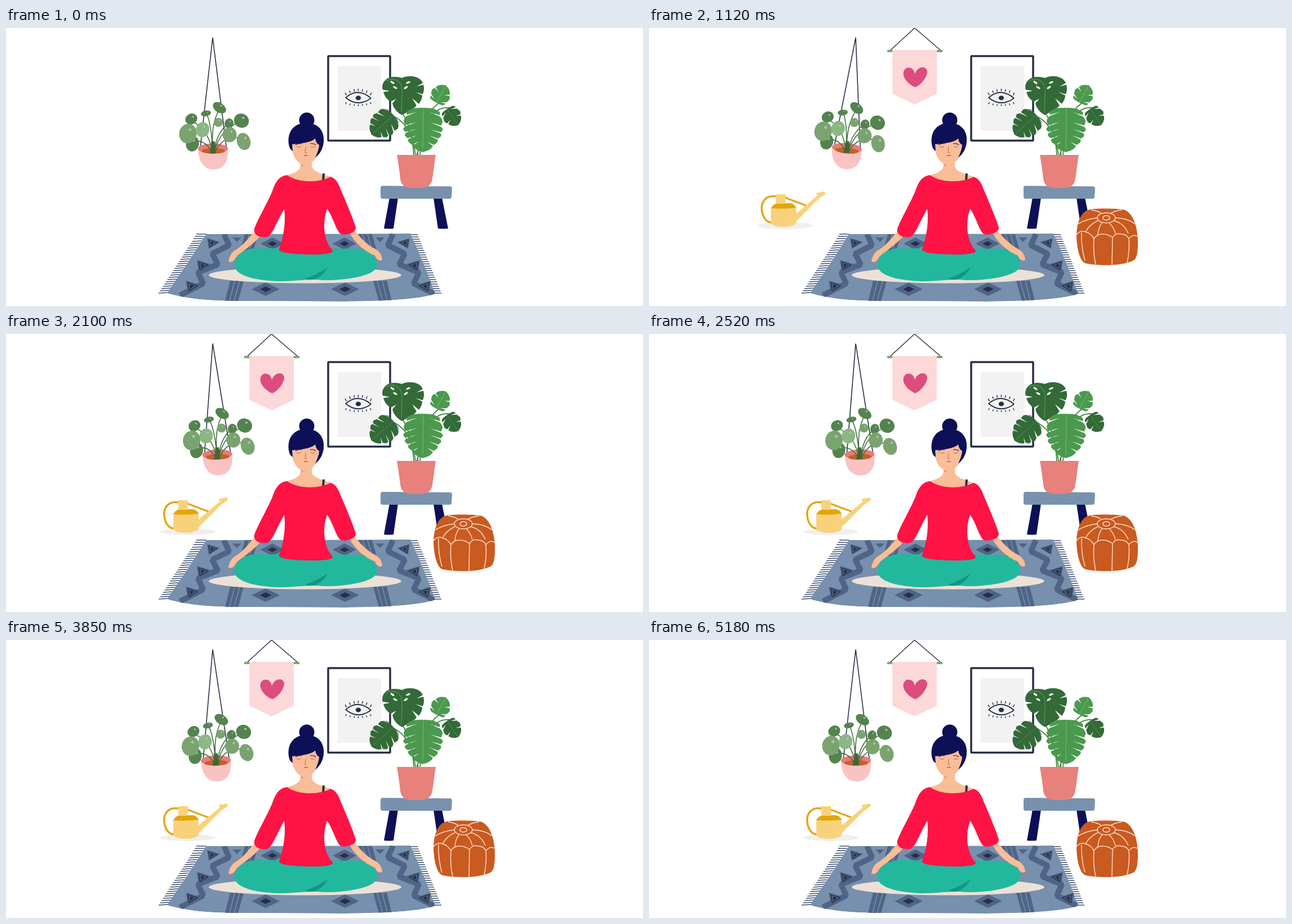
An HTML page with a canvas for the animation above (5.25 s loop, 1131x495 px).

```html
<!DOCTYPE html>
<html lang="en">
<head>
<meta charset="utf-8">
<title>Meditation room</title>
<style>
html, body { margin: 0; width: 100%; height: 100%; overflow: hidden; background: #fff; }
canvas { display: block; width: 1131px; height: 495px; }
</style>
</head>
<body>
<canvas id="stage" width="1131" height="495"></canvas>
<script>
const ctx = document.getElementById('stage').getContext('2d');
ctx.lineJoin = 'bevel';
const LOOP = 5250, STEP = 70;
const NAVY = '#0d1057', INK = '#272f47', SKIN = '#f9bd97', RUG = '#7690ad', BAND = '#4f6486';
const DARK = '#336a38', MID = '#4b994e', STEM = '#41803f';

// Sideways swing of the hanging plant: time, offset in px
const swing = [[0, 0], [470, 13.3], [560, 12.6], [1120, -14], [1270, -17.5], [1680, -4], [2240, 10],
  [2340, 12.5], [2520, 5.5], [2800, -9.5], [3050, -18], [3360, -9], [3850, 4.5], [4180, 13],
  [4480, -2], [4780, -18], [5040, -8.5], [5180, 0], [5250, 0]];

function fill(color, d) {
  ctx.fillStyle = color;
  ctx.fill(new Path2D(d));
}

function line(color, width, d) {
  ctx.strokeStyle = color;
  ctx.lineWidth = width;
  ctx.stroke(new Path2D(d));
}

function oval(color, x, y, rx, ry, rot = 0) {
  ctx.fillStyle = color;
  ctx.beginPath();
  ctx.ellipse(x, y, rx, ry, rot, 0, 7);
  ctx.fill();
}

function shifted(dx, draw) {
  ctx.save();
  ctx.translate(dx, 0);
  draw();
  ctx.restore();
}

const ramp = (t, from, to) => Math.min(1, Math.max(0, (t - from) / (to - from)));

// Monotone cubic through the given points
function curve(pts, t) {
  let i = 0;
  while (i < pts.length - 2 && t >= pts[i + 1][0]) i++;
  const rate = k => (pts[k + 1][1] - pts[k][1]) / (pts[k + 1][0] - pts[k][0]);
  const slope = k => {
    if (k === 0) return rate(0);
    if (k === pts.length - 1) return 0;
    const a = rate(k - 1), b = rate(k);
    return a * b <= 0 ? 0 : 2 * a * b / (a + b);
  };
  const [t0, y0] = pts[i], [t1, y1] = pts[i + 1];
  const h = t1 - t0, u = (t - t0) / h, v = 1 - u;
  return v * v * (1 + 2 * u) * y0 + u * u * (3 - 2 * u) * y1 + h * u * v * (v * slope(i) - u * slope(i + 1));
}

function diamond(color, x, y, w, h) {
  fill(color, `M${x - w},${y}L${x},${y - h}L${x + w},${y}L${x},${y + h}Z`);
}

function rugSide() {
  line(BAND, 10, 'M387,367L396,387L366,402L376,421L341,435L350,455L309,476');
  for (const [x, y, s] of [[368, 383, 1], [351, 423, 1.1], [332, 460, 1.15]]) {
    ctx.save();
    ctx.translate(x, y);
    ctx.scale(s, s);
    fill(BAND, 'M-11,-9L12,-2L-8,10Z');
    line(INK, 1.3, 'M-8,-6L7,-1L-6,7Z');
    fill(INK, 'M-5,-3L2,-1L-4,4Z');
    ctx.restore();
  }
  fill(BAND, 'M402,373L418,373L410,381Z');
  fill(BAND, 'M424,367L448,367L439,396L416,396Z');
  fill(BAND, 'M398,450L422,450L412,486L389,486Z');
  line(RUG, 1.5, 'M406,450L397,486M415,450L405,486M432,367L424,396M441,367L432,396');
}

function rug() {
  let d = '';
  for (let i = 0; i < 27; i++) {
    const k = i / 26;
    const y = 367 + 104 * k, l = 355 - 67 * k, r = 718 + 42 * k;
    d += `M${l},${y}l-17,${k < .1 ? 0 : 1}M${r},${y + 1}l13,0`;
  }
  line('#3b4d6e', 1.5, d);
  const shape = 'M355,367L718,366Q743,420 762,473C740,482 690,486 600,487L420,486C370,486 325,484 286,472Q322,420 355,367Z';
  ctx.save();
  ctx.clip(new Path2D(shape));
  fill(RUG, shape);
  rugSide();
  ctx.translate(1074, 0);
  ctx.scale(-1, 1);
  rugSide();
  ctx.restore();
  for (const [x, y, w, h] of [[473, 384, 21, 11], [601, 384, 21, 11], [461, 465, 25, 12], [602, 465, 25, 12]]) {
    diamond(BAND, x, y, w, h);
    diamond(INK, x, y, w * .4, h * .42);
  }
  oval('#ece1d7', 531, 440, 171, 14.5);
}

function woman() {
  fill(SKIN, 'M523,232L523,246C520,257 508,259 499,262C518,278 555,278 579,266C568,261 547,258 543,247L543,232Z');
  fill('#eb9f7e', 'M523,238Q533,246 541,236Q536,243 523,247Z');
  fill(SKIN, 'M507,204C506,226 517,243 531,244C546,243 557,225 556,204L534,190Z');
  oval(NAVY, 534, 164, 13.5, 13.5);
  fill(NAVY, 'M502,207C499,184 512,169 533,169C555,169 566,184 564,203C563,215 557,225 549,231C553,222 556,214 556,208C552,206 550,202 549,197C540,204 524,206 508,207L509,219C504,216 503,212 502,207Z');
  line(NAVY, 1.2, 'M514,208Q519,205 525,206M540,206Q546,205 550,208');
  line('#c2605a', 1, 'M516,211Q520,214 524,211M541,211Q545,214 549,211M532,212L531,222L534,222');
  line('#dc5a55', 1.7, 'M529,227L536,227');
  line(INK, 4, 'M564,259L563,273');
  fill(SKIN, 'M439,364C428,378 418,389 408,395C400,399 396,408 395,416C401,419 406,413 410,406C420,397 440,385 451,371Z');
  fill('#22b89e', 'M440,392C415,396 404,411 406,425C410,444 455,451 490,451C512,451 540,446 562,449C600,450 652,442 658,426C662,408 645,396 626,393Z');
  fill('#149681', 'M531,446C546,441 560,434 571,426C566,436 560,441 552,446C546,449 537,449 531,446Z');
  fill(SKIN, 'M618,360C630,374 642,387 655,393C663,397 668,405 668,413C662,416 657,411 655,405C642,400 626,390 612,369Z');
  fill('#ff1345', 'M499,262C485,263 478,275 473,290C464,312 448,338 441,357C438,369 452,374 464,372C474,367 478,350 494,322C497,345 493,372 485,393C482,399 500,402 530,403C562,404 585,402 579,395C563,377 562,345 570,322C580,335 583,352 592,365C599,372 623,365 621,355C615,336 603,308 594,287C589,273 584,267 576,265C555,276 519,276 499,262Z');
}

function picture() {
  ctx.fillStyle = '#f2f2f2';
  ctx.fillRect(589, 68, 77, 115);
  ctx.strokeStyle = INK;
  ctx.lineWidth = 3.5;
  ctx.strokeRect(572, 50, 110, 150.5);
  line(INK, 1.8, 'M603,124Q625,105 648,125Q625,142 603,124Z');
  oval(INK, 625.5, 124.5, 4.7, 4);
  let d = '';
  for (let i = -3; i <= 3; i++) {
    const x = 625.5 + i * 7, dip = i * i * .8;
    d += `M${x},${112.5 + dip}l${i * .8},-4.5M${x},${136 - dip * .5}l${i * .6},3`;
  }
  line(INK, 1.4, d);
}

// Split leaf from its base to its tip, with n lobes on each side
function leaf(color, vein, x0, y0, x1, y1, w, n) {
  const h = Math.hypot(x1 - x0, y1 - y0), side = [];
  for (let k = 0; k < n; k++) {
    for (let j = 0; j <= 5; j++) {
      const t = (k + j / 5 * (k < n - 1 ? .84 : 1)) / n;
      const bulge = 1 - .04 * Math.abs(j - 2.5);
      side.push([w * Math.pow(Math.max(0, Math.sin(Math.PI * Math.pow(t, .85))), .6) * bulge,
        h * (t - .11 * Math.sin(Math.PI * Math.min(1, t * 2.4)))]);
    }
    if (k < n - 1) {
      const [px, py] = side[side.length - 1];
      side.push([px * .38, py - h * .07]);
    }
  }
  side[side.length - 1] = [0, h];
  ctx.save();
  ctx.translate(x0, y0);
  ctx.rotate(Math.atan2(y1 - y0, x1 - x0) - Math.PI / 2);
  ctx.beginPath();
  side.forEach(p => ctx.lineTo(p[0], p[1]));
  side.reverse().forEach(p => ctx.lineTo(-p[0], p[1]));
  ctx.closePath();
  ctx.fillStyle = color;
  ctx.fill();
  line(vein, 1, `M0,0L0,${h * .92}`);
  ctx.restore();
}

function monstera() {
  line(STEM, 1.8, 'M724,227Q722,180 703,150M727,227Q722,175 690,158M731,227Q733,160 768,134M735,227Q740,140 787,142M729,227L740,195');
  fill(DARK, 'M703,89C715,83 735,85 740,98L729,104L741,101C743,107 742,113 740,118L727,114L739,120C739,126 736,131 733,135L721,125L729,138C721,147 709,151 703,155C694,150 688,143 686,134L693,126L683,131C676,127 672,121 670,114L682,112L669,110C665,98 676,86 689,87C696,87 700,88 703,89Z');
  line('#4f8b4b', 1.6, 'M675,94C692,86 704,96 703,115L702,150');
  for (const [x, y, r] of [[714, 97, .4], [710, 106, .6], [691, 106, -.5], [686, 97, -.6]]) oval('#fff', x, y, 4, 1.7, -r);
  leaf(DARK, '#4f8b4b', 688, 155, 649, 190, 25, 5);
  leaf(MID, '#78b874', 741, 142, 740, 221, 36, 7);
  leaf(MID, '#78b874', 764, 133, 781, 102, 18, 3);
  leaf(DARK, '#4f8b4b', 783, 144, 803, 173, 17, 3);
  fill('#e8807c', 'M694,226L763,226C760,245 759,257 757,268C755,283 745,285 728,285C711,285 702,283 700,268C698,250 696,238 694,226Z');
}

function stool() {
  fill(NAVY, 'M681,302L696,302L688,357Q680,358 671,357Z');
  fill(NAVY, 'M759,302L774,302L785,357Q776,358 767,357Z');
  fill('#7892ad', 'M669,281L788,282Q792,282 792,286L791,301Q791,304 787,304L669,304Q665,304 665,300L665,285Q665,281 669,281Z');
}

function hangingPlant(offset) {
  ctx.save();
  ctx.translate(367, 17);
  ctx.rotate(-offset / 171);
  ctx.translate(-367, -17);
  line(INK, 1.6, 'M345,212L367,17L391,211');
  fill('#f9c3c4', 'M341,214C341,239 352,252 369,252C386,252 396,238 394,214Z');
  oval('#e97b79', 367.5, 214.5, 26.5, 9);
  oval('#c4602a', 368, 219, 21, 5);
  line('#41703c', 1.6, 'M366,222Q362,184 331,166M366,222Q354,198 333,202M367,222Q365,170 356,153M368,222Q362,170 380,144M369,222Q374,184 396,170M369,222Q382,176 416,168M370,222Q388,186 420,198');
  fill('#3c6837', 'M361,223Q366,212 364,202L371,202Q370,213 373,223Z');
  const deep = '#54834f', soft = '#7aa370';
  for (const [x, y, rx, ry, rot, color] of [
    [329, 162, 11, 9.5, -.5, deep], [331, 206, 11.5, 14, .2, deep], [323, 188, 15.5, 17.5, .2, soft],
    [349, 181, 12, 13.5, .2, '#8cb683'], [355, 152, 9, 5, -.2, deep], [379, 142, 13, 8.5, .6, deep],
    [377, 168, 8, 8, 0, soft], [396, 170, 8, 9, .2, deep], [418, 165, 13.5, 12.5, .5, deep],
    [397, 190, 12.5, 13.5, 0, soft], [422, 202, 12, 15.5, -.3, soft]]) {
    oval(color, x, y, rx, ry, rot);
    oval('#a9cb9f', x + rx * .25, y - ry * .4, rx * .16, ry * .14, .5);
  }
  ctx.restore();
}

function banner() {
  line(INK, 1.4, 'M428,40L471.5,0L518,40');
  fill('#7fa36f', 'M423,39H521V43H423Z');
  fill('#fcd8d8', 'M432,39H511V117L471.5,136L432,117Z');
  fill('#dc4c7c', 'M472,82C470,67 453,67 451.5,80C451,91 463,102 473,105.5C481,102 493,90 494,78C493,66 476,68 472,82Z');
}

function wateringCan() {
  const pale = '#f8d27b', gold = '#e3a50b';
  oval('#efefef', 323, 352, 49, 6);
  line(gold, 3.5, 'M306,300C287,297 279,311 281,325C283,339 291,347 299,346');
  line(gold, 3, 'M322,302L362,317');
  fill(pale, 'M297,319H342V348Q335,354 319,354Q303,354 297,348Z');
  fill(gold, 'M297,321Q301,313 309,312H332Q340,314 342,320Q320,323 297,321Z');
  fill(pale, 'M306,296H323V313H306Z');
  fill(pale, 'M341,331L381,297L385,301L341,345Z');
  fill(pale, 'M377,294L392,291L394,296L383,303Z');
}

function pouf() {
  const seam = '#fbdcc8';
  fill('#c95a20', 'M783,323C800,321 830,321 845,324C862,332 868,360 868,382C868,400 866,411 860,414C840,424 800,424 775,419C763,415 759,385 759,368C760,345 767,326 783,323Z');
  ctx.strokeStyle = seam;
  ctx.lineWidth = 1.6;
  for (const [rx, ry] of [[16, 9], [6, 4]]) {
    ctx.beginPath();
    ctx.ellipse(812, 338, rx, ry, 0, 0, 7);
    ctx.stroke();
  }
  line(seam, 1.5, 'M762,349Q776,340 796,338M797,343Q782,350 775,363M805,346Q798,354 797,368M817,347Q825,354 828,366M825,343Q843,347 851,366M828,338Q849,338 863,349M803,330Q796,325 785,324M820,330Q828,325 840,324');
  line(seam, 1.5, 'M759,368Q766,359 775,363Q784,365 790,375Q796,366 806,367Q815,367 823,373Q829,364 838,367Q848,367 852,375Q860,366 867,371M768,364Q767,390 774,414M790,375Q788,398 793,421M823,373L822,423M852,375Q854,395 849,418');
}

function draw(t) {
  ctx.fillStyle = '#fff';
  ctx.fillRect(0, 0, 1131, 495);
  const bannerX = t < 490 ? -522 + 523 * ramp(t, 0, 490) : 1 - ramp(t, 560, 1190);
  shifted(bannerX, banner);
  picture();
  stool();
  monstera();
  hangingPlant(curve(swing, t));
  shifted(-403 * (1 - ramp(t, 0, 1400)), wateringCan);
  rug();
  woman();
  shifted(373 * (1 - ramp(t, 364, 1018)), pouf);
}

function tick() {
  const t = performance.now() % LOOP;
  draw(Math.floor(t / STEP) * STEP);
  requestAnimationFrame(tick);
}
tick();
</script>
</body>
</html>
```
